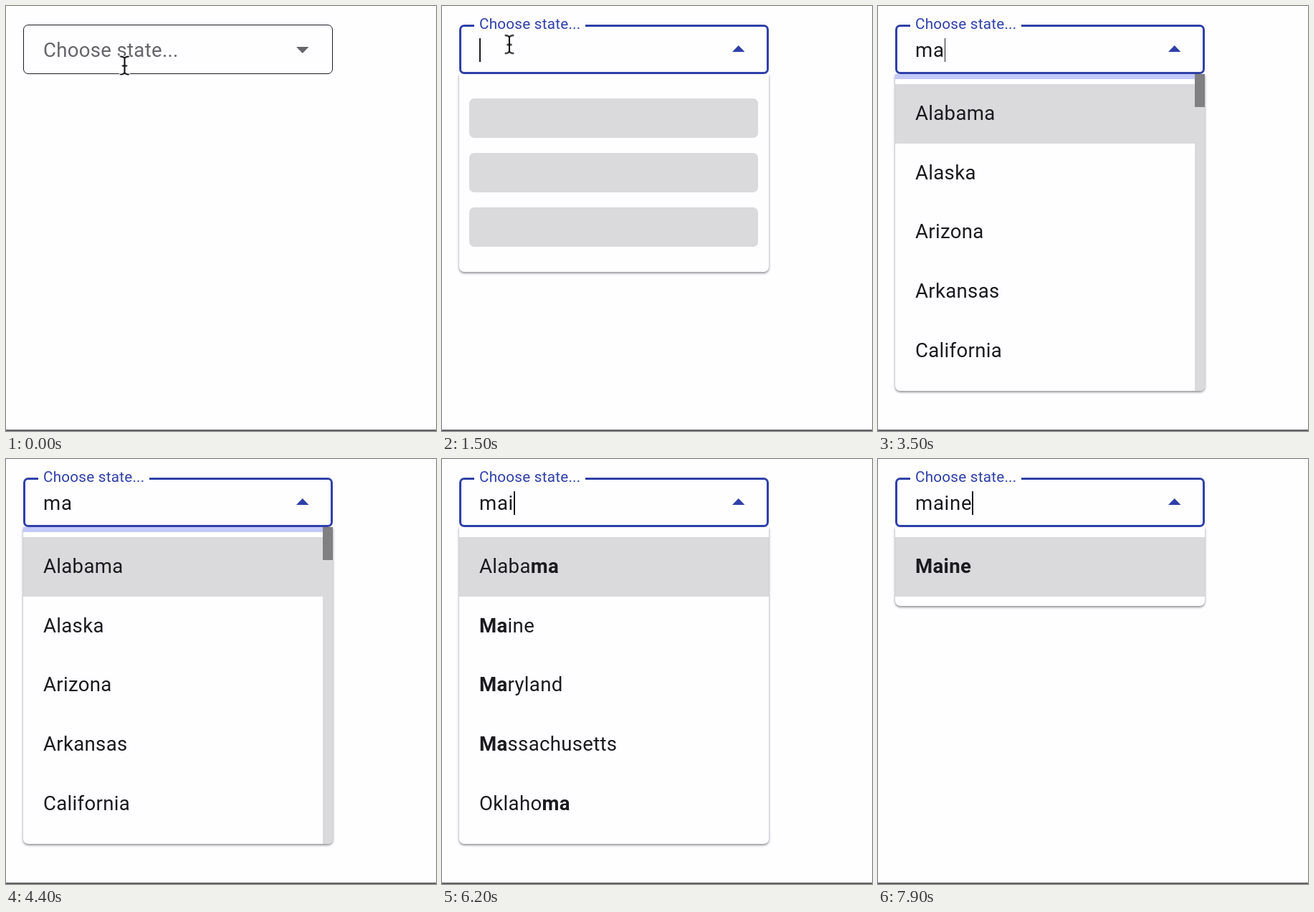
These frames come from a looping animation (600x593 px, 8000 ms). An HTML page:

```html
<!DOCTYPE html>
<html lang="en">
<head>
<meta charset="utf-8">
<title>State autocomplete</title>
<style>
  :root { --bg: #fefdff; --ink: #1b1b1f; --blue: #2f40a8; --grey: #dad9db; }
  html, body { margin: 0; width: 100%; height: 100%; overflow: hidden; background: var(--bg); }
  body { font: 27.6px Roboto, sans-serif; letter-spacing: .3px; color: var(--ink); }
  div, svg { position: absolute; box-sizing: border-box; white-space: pre; }
  #stage { left: 0; top: 0; width: 600px; height: 593px; overflow: hidden; }
  #floor { left: 0; top: 591px; width: 600px; height: 1.5px; background: #626164; }

  #field { left: 24px; top: 26px; width: 431.5px; height: 69px; border: 1.7px solid var(--ink);
    border-radius: 7px; background: var(--bg); }
  #notch { left: 45px; top: 25px; width: 155px; height: 6px; background: var(--bg); }
  #label { left: 52px; top: 45px; line-height: 33px; color: #66656a; transform-origin: 0 50%; }
  #input { left: 52px; top: 45px; line-height: 33px; letter-spacing: .7px; }
  #caret { display: inline-block; position: relative; width: 1.7px; height: 33px; vertical-align: top; background: var(--ink); }
  #arrow { left: 405px; top: 57px; width: 17.5px; height: 9px; background: #66656a;
    clip-path: polygon(0 0, 100% 0, 50% 100%); }
  .focus #field { border: 3.45px solid var(--blue); }
  .focus #label { color: var(--blue); }
  .focus #arrow { top: 55px; background: var(--blue); clip-path: polygon(0 100%, 100% 100%, 50% 0); }

  #panel { left: 24px; top: 95px; width: 431.5px; overflow: hidden; background: var(--bg);
    border-radius: 0 0 7px 7px; transform-origin: 50% 0;
    box-shadow: 0 2px 3px rgba(0,0,0,.32), 0 1px 5px rgba(0,0,0,.18); }
  .bone { left: 14px; width: 403px; height: 55px; border-radius: 7px; background: var(--grey); }
  .row { left: 0; width: 100%; height: 82.8px; padding-left: 28px; line-height: 82.8px; }
  .row:first-child { background: var(--grey); }
  b { font-weight: 700; }
  #track { right: 0; top: 0; width: 14px; height: 100%; background: var(--grey); }
  #thumb { width: 14px; height: 46px; background: #807f82; }

  #progress { left: 0; top: 0; height: 6.5px; overflow: hidden; background: #c3caf8; }
  #progress div { width: 100%; height: 100%; }
  #first { left: -145.166611%; }
  #second { left: -54.888891%; }
  .fill { background: #3e56f5; }
  #pointer { left: -10px; top: -18px; }
</style>
</head>
<body>
<div id="stage">
  <div id="floor"></div>
  <div id="panel">
    <div id="content"></div>
    <div id="progress">
      <div id="first"><div class="fill"></div></div>
      <div id="second"><div class="fill"></div></div>
    </div>
    <div id="track"><div id="thumb"></div></div>
  </div>
  <div id="field"></div>
  <div id="notch"></div>
  <div id="label">Choose state...</div>
  <div id="input"><span id="typed"></span><span id="caret"></span></div>
  <div id="arrow"></div>
  <svg id="pointer" width="20" height="36" viewBox="-10 -18 20 36" fill="none" stroke-linecap="round">
    <path id="halo" stroke="#fff" stroke-width="4.6"/>
    <path id="beam" stroke="#0c0c0e" stroke-width="2.1"/>
  </svg>
</div>
<script>
const LOOP = 8000, OPEN = 500, ROW = 82.8, PAD = 13.8;
const $ = id => document.getElementById(id);

const keys = [[0, ''], [OPEN, ''], [2200, 'm'], [2500, 'ma'], [6200, 'mai'], [6500, 'main'], [6800, 'maine']];
const lists = [
  [0, null],
  [1600, ['Alabama', 'Alaska', 'Arizona', 'Arkansas', 'California'], ''],
  [4500, ['Alabama', 'Maine', 'Maryland', 'Massachusetts', 'Oklahoma'], 'ma'],
  [7600, ['Maine'], 'maine']
];
const loads = [[2800, 4500], [7100, 7600]];
const WARMUP = 170;

const current = (table, t) => table.filter(step => step[0] <= t).pop();
const show = (el, on) => { el.style.visibility = on ? 'visible' : 'hidden'; };

const ibeam = 'M-5.5-12.5Q-1-12.5 0-9.5Q1-12.5 5.5-12.5M0-9.5V9.5' +
  'M-5.5 12.5Q-1 12.5 0 9.5Q1 12.5 5.5 12.5M-2.8 .5H2.8';
$('halo').setAttribute('d', ibeam);
$('beam').setAttribute('d', ibeam);

// Paused animations, positioned by hand from the loop time.
function scrubbed(el, frames, duration, easing = 'linear') {
  const anim = el.animate(frames, { duration, easing, fill: 'both' });
  anim.pause();
  return t => { anim.currentTime = Math.max(0, Math.min(t, duration)); };
}

// Each step: offset, value, bezier to the next step.
const steps = (table, wrap) => table.map(([offset, value, curve]) => ({
  offset, transform: wrap(value), easing: curve ? `cubic-bezier(${curve})` : 'linear'
}));
const slide = v => `translateX(${v}%)`;
const scale = v => `scaleX(${v})`;

const pointer = scrubbed($('pointer'), [
  { transform: 'translate(165.5px, 83px)' }, { transform: 'translate(94px, 53.5px)' }
], 300, 'ease-in-out');
const label = scrubbed($('label'), [
  { transform: 'none' }, { transform: 'translateY(-36.3px) scale(.75)' }
], 150, 'cubic-bezier(.4,0,.2,1)');
const panel = scrubbed($('panel'), [
  { opacity: 0, transform: 'scaleY(.8)' }, { opacity: 1, transform: 'none' }
], 120, 'cubic-bezier(0,0,.2,1)');

const bars = [
  [$('first'), slide, [
    [0, 0], [.2, 0, '.5,0,.701732,.495819'],
    [.5915, 83.67142, '.302435,.381352,.55,.956352'], [1, 200.611057]]],
  [$('first').firstChild, scale, [
    [0, .08], [.3665, .08, '.334731,.12482,.785844,1'],
    [.6915, .661479, '.06,.11,.6,1'], [1, .08]]],
  [$('second'), slide, [
    [0, 0, '.15,0,.515058,.409685'], [.25, 37.651913, '.31033,.284058,.8,.733712'],
    [.4835, 84.386165, '.4,.627035,.6,.902026'], [1, 160.277782]]],
  [$('second').firstChild, scale, [
    [0, .08, '.205028,.057051,.57661,.453971'], [.1915, .457104, '.152313,.196432,.648374,1.004315'],
    [.4415, .72796, '.257759,-.003163,.211762,1.38179'], [1, .08]]]
].map(([el, wrap, table]) => scrubbed(el, steps(table, wrap), 2000));

function mark(name, query) {
  const at = name.toLowerCase().lastIndexOf(query);
  if (!query || at < 0) return name;
  const end = at + query.length;
  return `${name.slice(0, at)}<b>${name.slice(at, end)}</b>${name.slice(end)}`;
}

let shown;
function fill(list) {
  if (list === shown) return;
  shown = list;
  const [, names, query] = list;
  const html = names
    ? names.map((n, i) => `<div class="row" style="top:${PAD + i * ROW}px">${mark(n, query)}</div>`)
    : [34, 110, 186].map(y => `<div class="bone" style="top:${y}px"></div>`);
  const long = names && !query;
  $('content').innerHTML = html.join('');
  $('content').style.cssText = 'left:0;top:0;width:100%;height:100%';
  $('panel').style.height = (names ? 2 * PAD + names.length * ROW : 276) + 'px';
  $('track').style.display = long ? 'block' : 'none';
  $('progress').style.width = long ? '417.5px' : '100%';
}

function draw(t) {
  const open = t >= OPEN;
  $('stage').className = open ? 'focus' : '';
  show($('notch'), open);
  show($('panel'), open);
  show($('pointer'), t < 2200);
  pointer(t - 200);
  label(t - OPEN);
  panel(t - OPEN);
  fill(current(lists, t));

  const [pressed, text] = current(keys, t);
  $('typed').textContent = text;
  show($('caret'), open && Math.floor((t - pressed) / 500) % 2 === 0);

  const load = loads.find(([from, to]) => t >= from && t < to);
  $('progress').style.display = load ? 'block' : 'none';
  if (load) bars.forEach(bar => bar(Math.max(0, t - load[0] - WARMUP) % 2000));
}

const began = performance.now();
function tick() {
  draw((performance.now() - began) % LOOP);
  requestAnimationFrame(tick);
}
tick();
</script>
</body>
</html>
```
